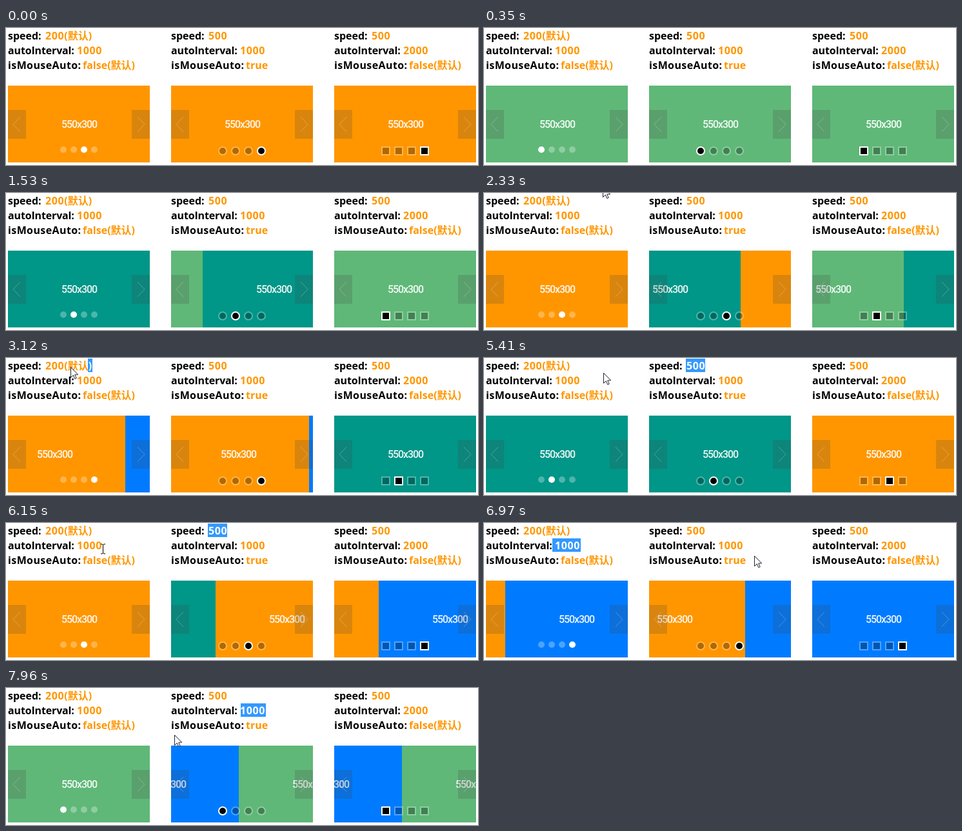
Write an HTML page that moves like this. It is 732 by 214 pixels and loops after 8000 ms.

```html
<!DOCTYPE html>
<html lang="zh">
<head>
<meta charset="utf-8">
<style>
html, body { margin: 0; width: 732px; height: 214px; overflow: hidden; background: #fff; }
svg { display: block; overflow: hidden; }
text { white-space: pre; font: bold 16px "Open Sans", "Noto Sans", "Noto Sans CJK SC", "Noto Sans CJK", sans-serif; }
.num { letter-spacing: .6px; }
.size { font: 500 16px Roboto, sans-serif; letter-spacing: -1.1px; fill: #fff; fill-opacity: .92; text-anchor: middle; }
</style>
</head>
<body>
<svg id="stage" width="732" height="214"></svg>
<script>
const LOOP = 8000, W = 220, H = 120, COL = 253, ROW = 23;
const COLORS = ['#5fb878', '#009688', '#ff9600', '#007bff'];
const ROWS = [
  { label: 'speed:', valueX: 61, tracking: 0 },
  { label: 'autoInterval:', valueX: 110, tracking: -.15 },
  { label: 'isMouseAuto:', valueX: 119, tracking: .4 }
];
const stage = document.getElementById('stage');

// first: when the green slide comes in; beat: time between turns; late: delay of the opening turn.
const panels = [
  { values: ['200(默认)', '1000', 'false(默认)'], speed: 186, first: 250, beat: 940, late: 200, shape: 'dot' },
  { values: ['500', '1000', 'true'], speed: 465, first: 282, beat: 930, late: 1, shape: 'round' },
  { values: ['500', '2000', 'false(默认)'], speed: 465, first: 282, beat: 1860, late: 0, shape: 'square' }
];

// The pointer drags over a value from right to left; the selection trails behind it.
const TRAIL = 110;
const drags = [
  { start: 2985, end: 3275, col: 0, row: 0, right: 134, left: 61 },
  { start: 4290, end: 4790, col: 1, row: 0, right: 343, left: 313 },
  { start: 6200, end: 6350, col: 0, row: 1, right: 150, left: 106 },
  { start: 7190, end: 7440, col: 1, row: 1, right: 403, left: 364 }
];
const stops = [[2250, 205, -20], [5410, 185, 23], [6970, 419, 51], [7960, 261, 73]];
const path = drags.flatMap(d => {
  const y = 14 + ROW * d.row;
  return [[d.start, d.right, y], [d.end, d.left, y]];
}).concat(stops).sort((a, b) => a[0] - b[0]);

function set(el, attrs) {
  for (const key in attrs) el.setAttribute(key, attrs[key]);
}
function add(parent, tag, attrs = {}, html = '') {
  const el = document.createElementNS('http://www.w3.org/2000/svg', tag);
  set(el, attrs);
  el.innerHTML = html;
  return parent.appendChild(el);
}
const spaced = s => s.replace(/\d+/, '<tspan class="num">$&</tspan>');
const clamp = v => Math.min(1, Math.max(0, v));
const mix = (a, b, k) => Math.round(a + (b - a) * k);
const baseline = row => 18 + ROW * row;

function addMark(box, shape, i) {
  const g = add(box, 'g');
  if (shape === 'dot') {
    add(g, 'circle', { cx: 86 + 16 * i, cy: 100, r: 5, fill: '#fff' });
    return g;
  }
  const x = 80 + 20 * i, y = 102;
  for (const [r, fill] of [[7, '#fff'], [5, '#000']]) {
    add(g, 'rect', { x: x - r, y: y - r, width: 2 * r, height: 2 * r, rx: shape === 'round' ? r : 0, fill });
  }
  return g;
}

panels.forEach((p, col) => {
  ROWS.forEach(({ label, valueX, tracking }, row) => {
    const y = baseline(row);
    add(stage, 'text', { x: 3 + COL * col, y, 'letter-spacing': tracking }, label);
    add(stage, 'text', { x: valueX + COL * col, y, fill: '#ff9600' }, spaced(p.values[row]));
  });

  const box = add(stage, 'svg', { x: 3 + COL * col, y: 90, width: W, height: H });
  p.slides = [0, 1].map(() => {
    const g = add(box, 'g');
    add(g, 'rect', { width: W, height: H });
    add(g, 'text', { x: 110.5, y: 66, class: 'size' }, '550x300');
    return g;
  });
  for (const [x, d] of [[0, 'M19 49L8 60.5L19 72'], [192, 'M201 49L212 60.5L201 72']]) {
    add(box, 'rect', { x, y: 38, width: 28, height: 45, fill: '#444', 'fill-opacity': .2 });
    add(box, 'path', { d, fill: 'none', stroke: '#fff', 'stroke-opacity': .25 });
  }
  p.marks = COLORS.map((_, i) => addMark(box, p.shape, i));
});

const marked = add(stage, 'svg', { height: 21 });
add(marked, 'rect', { width: '100%', height: '100%', fill: '#3399ff' });
const markedText = add(marked, 'text', { fill: '#fff' });
const arrow = add(stage, 'path', {
  d: 'M.5 .5V16.5L4.3 12.9L6.8 18.6L9.2 17.5L6.7 12H11.7Z', fill: '#fff', stroke: '#223'
});
const beam = add(stage, 'path', {
  d: 'M-3 -4H-1L.5 -3L2 -4H4M.5 -3V10M-3 11H-1L.5 10L2 11H4', fill: 'none', stroke: '#000'
});

// A short cut from the opening turn, then a skip ahead to the settled green slides.
function panelTime(p, t) {
  if (t < 280) return p.first - p.beat - p.late + Math.min(t, 140);
  return Math.min(t + 400, Math.max(t, 1180));
}

function drawPanel(p, t) {
  const since = panelTime(p, t) - p.first;
  const turn = Math.floor(since / p.beat);
  const to = (turn + 4) % 4;
  const part = clamp((since - turn * p.beat) / p.speed);
  const moved = Math.round(W * (.5 - Math.cos(Math.PI * part) / 2));
  p.slides.forEach((g, i) => {
    set(g, { transform: `translate(${i * W - moved})` });
    set(g.firstChild, { fill: COLORS[(to + 3 + i) % 4] });
  });
  p.marks.forEach((g, i) => set(g, { opacity: i === to ? 1 : .3 }));
}

function drawSelection(t) {
  const d = drags.findLast(d => d.start <= t);
  marked.style.display = d ? '' : 'none';
  if (!d) return;
  const x = mix(d.right, d.left, clamp((t - d.start) / (d.end - d.start)));
  const y = 1 + ROW * d.row;
  set(marked, { x, y, width: d.right - x });
  set(markedText, { x: ROWS[d.row].valueX + COL * d.col - x, y: baseline(d.row) - y });
  markedText.innerHTML = spaced(panels[d.col].values[d.row]);
}

function drawPointer(t) {
  const i = path.findLastIndex(k => k[0] <= t);
  const overText = drags.some(d => t > d.start - 150 && t < d.start);
  arrow.style.display = i < 0 || overText ? 'none' : '';
  beam.style.display = overText ? '' : 'none';
  if (i < 0) return;
  const a = path[i], b = path[i + 1] || a;
  const k = clamp((t - a[0]) / (b[0] - a[0] || 1));
  const dragging = drags.some(d => d.start === a[0]);
  const eased = dragging ? k : 1 - (1 - k) ** 3;
  set(overText ? beam : arrow, { transform: `translate(${mix(a[1], b[1], eased)} ${mix(a[2], b[2], eased)})` });
}

const origin = performance.now();
function frame() {
  const t = (performance.now() - origin) % LOOP;
  panels.forEach(p => drawPanel(p, t));
  drawSelection(t - TRAIL);
  drawPointer(t);
  requestAnimationFrame(frame);
}
frame();
</script>
</body>
</html>
```
